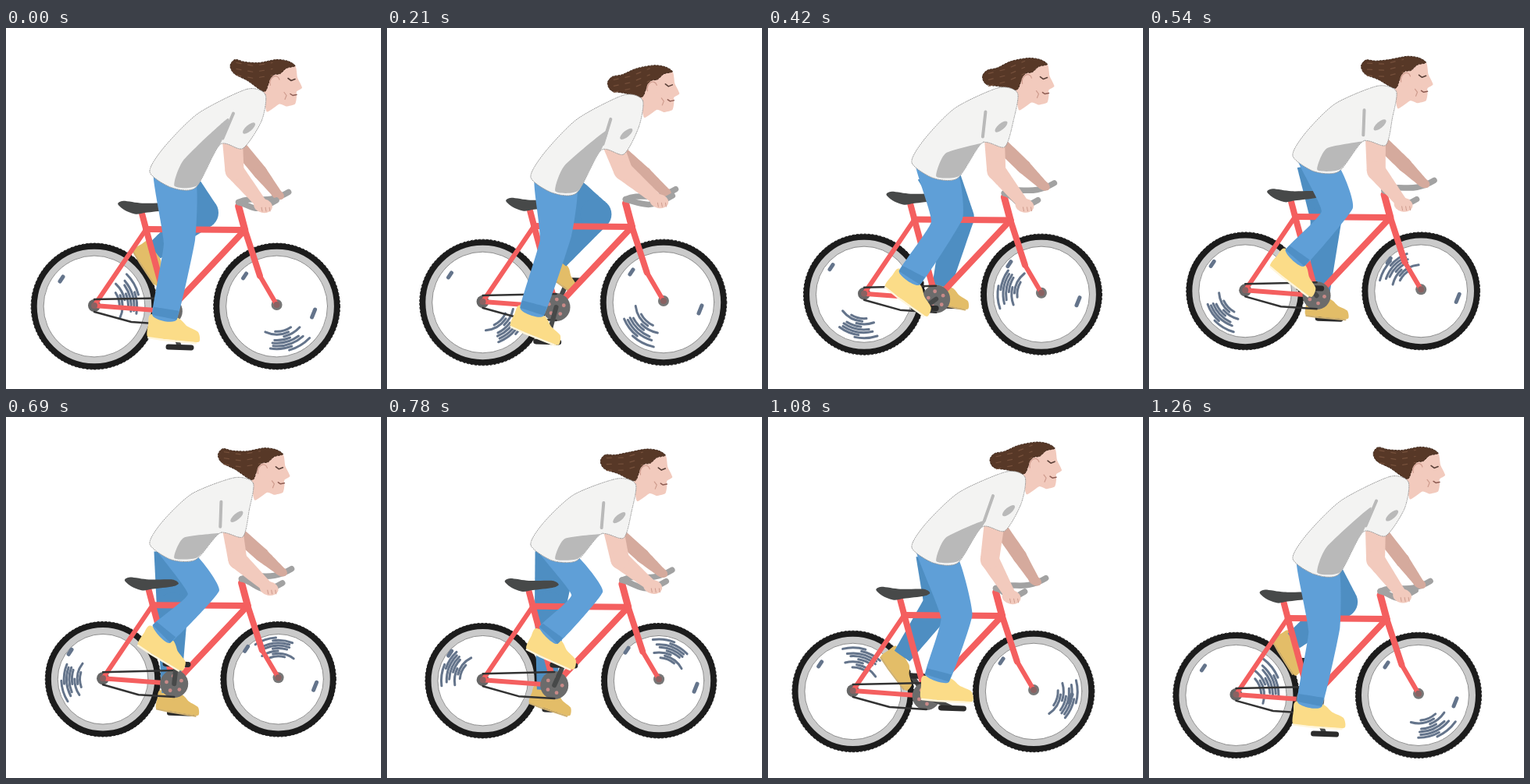
An HTML page with a canvas for the animation above (1.29 s loop, 480 by 463 pixels).

```html
<!DOCTYPE html>
<html lang="en">
<head>
<meta charset="utf-8">
<title>Cyclist</title>
<style>
html, body { margin: 0; width: 100%; height: 100%; overflow: hidden; background: #fff; }
canvas { display: block; }
</style>
</head>
<body>
<canvas id="stage" width="480" height="463"></canvas>
<script>
const ctx = document.getElementById('stage').getContext('2d');
const LOOP = 1290, STEP = 30;
let phase = 0; // crank angle, one turn per loop

const skin = '#f2cabd', farSkin = '#d5aa9d', skinLine = '#cf9c8e', red = '#f45f5f', jeans = '#5f9fd7',
  farJeans = '#4e8ec2', cuff = '#4f8fc5', yellow = '#fbdc88', farYellow = '#e3bd68', hairColor = '#573827',
  tyre = '#1c1c1c', rim = '#cacaca', streak = '#64748b', bar = '#a2a2a2', dark = '#474949',
  shirtColor = '#f3f3f2', shade = '#b9b9b9';

// Everything sways once per crank turn, and bobs once per pedal stroke (twice per turn).
const wave = (base, cos = 0, sin = 0, bob = 0) =>
  base + cos * Math.cos(phase) + sin * Math.sin(phase) + bob * Math.sin(2 * phase);

const add = ([x, y], dx, dy) => [x + dx, y + dy];
const mix = (a, b, u) => [a[0] + (b[0] - a[0]) * u, a[1] + (b[1] - a[1]) * u];

function side(a, b, width) {
  const angle = Math.atan2(b[1] - a[1], b[0] - a[0]);
  return [-Math.sin(angle) * width, Math.cos(angle) * width];
}

function fill(color) { ctx.fillStyle = color; ctx.fill(); }
function stroke(color, width) { ctx.strokeStyle = color; ctx.lineWidth = width; ctx.stroke(); }

function line(color, width, ...points) {
  ctx.beginPath();
  points.forEach(p => ctx.lineTo(...p));
  stroke(color, width);
}

function disc([x, y], r, color, ry = r, angle = 0) {
  ctx.beginPath();
  ctx.ellipse(x, y, r, ry, angle, 0, 7);
  fill(color);
}

// Closed spline; roundness 0 gives straight sides.
function blob(points, roundness, color) {
  const n = points.length, p = i => points[(i + n) % n], k = roundness / 6;
  ctx.beginPath();
  ctx.moveTo(...p(0));
  for (let i = 0; i < n; i++) {
    const [a, b, c, d] = [p(i - 1), p(i), p(i + 1), p(i + 2)];
    ctx.bezierCurveTo(b[0] + (c[0] - a[0]) * k, b[1] + (c[1] - a[1]) * k,
      c[0] - (d[0] - b[0]) * k, c[1] - (d[1] - b[1]) * k, ...c);
  }
  ctx.closePath();
  fill(color);
}

function limb(joints, widths, color) {
  for (let i = 0; i < joints.length - 1; i++) {
    const a = joints[i], b = joints[i + 1];
    const [ax, ay] = side(a, b, widths[i]), [bx, by] = side(a, b, widths[i + 1]);
    blob([add(a, ax, ay), add(b, bx, by), add(b, -bx, -by), add(a, -ax, -ay)], 0, color);
    if (i) disc(a, widths[i], color);
  }
}

function bikePose() {
  const hub = [wave(118.5, -5.5, 5, 3), wave(345.5, 10.5)], size = wave(1, 0.02);
  const at = (x, y) => add(hub, x * size, y * size);
  return { hub, axle: at(229, -1), crank: at(93, 7), post: at(60, -115), seat: at(65, -96),
    stem: at(181, -125), head: at(189, -95), radius: wave(77.5, 3.4, 1.8) };
}

function riderPose(bike) {
  const nose = [wave(371, 8, -1), wave(75.5, 1, 4, 5)];
  const hemFront = [243, wave(193.5, 11, 9, 5)], hemBack = add(hemFront, -59, -20);
  const hand = [wave(331, -2, 8, 13), wave(225, 3, 0, -5)], farGrip = add(bike.stem, 64, -18);
  return {
    nose, hemFront, hemBack, hand, farGrip,
    neckFront: add(nose, -47, 9), neckBack: add(nose, -71, 2), chest: add(nose, -52, 43),
    armpit: [274, nose[1] + 73], sleeve: [303, nose[1] + 78],
    elbow: [128 + hand[0] / 2, 183], farHand: add(farGrip, -14, 3),
    knee: [wave(236, -14, -15), wave(250, 24, 8)],
    ankle: [wave(199, 4, -18), wave(326, 45, 17)],
    footAngle: wave(17, -14, 11),
    farKnee: [wave(234, 18, 24, 4), wave(241, -4)],
    farAnkle: [wave(202, -12, 22, 6), wave(320, -34, -5)],
    farFootAngle: wave(29, 25, -10),
  };
}

function wheel(center, radius, angle, dots) {
  ctx.save();
  ctx.translate(...center);
  const ring = (r, color, width) => { ctx.beginPath(); ctx.arc(0, 0, r, 0, 7); stroke(color, width); };
  ring(radius - 11.5, rim, 9);
  ring(radius - 3.8, tyre, 7.6);
  ring(radius - 16, '#777', 0.8);
  ctx.setLineDash([2, 3]);
  ring(radius, tyre, 1);
  ctx.setLineDash([]);
  for (let i = 0; i < 8; i++) {
    const start = angle - 0.42 + 0.24 * Math.sin(i * 2.4);
    ctx.beginPath();
    ctx.arc(0, 0, (0.4 + 0.046 * i) * radius, start, start + 0.65 + 0.2 * Math.sin(i * 1.7));
    stroke(streak, 3);
  }
  for (const [x, y, tilt] of dots) line(streak, 5, [x - 2, y + tilt], [x + 2, y - tilt]);
  ctx.restore();
}

function foot(ankle, degrees, scale, color, sole) {
  ctx.save();
  ctx.translate(...ankle);
  ctx.rotate(degrees * Math.PI / 180);
  ctx.scale(scale, scale);
  blob([[-18, -3], [17, 0], [30, 10], [45, 17], [48, 27], [43, 31], [0, 29], [-21, 27], [-21, 10]], 0.7, color);
  line(sole, 2.5, [-20, 28], [0, 30], [43, 32]);
  ctx.restore();
}

function pedal(crank, at) {
  line(dark, 6, crank, at);
  line('#2c2c2c', 7, add(at, -14, 0), add(at, 15, 1));
}

function handlebar(stem, end, lift) {
  const [x, y] = add(stem, 0, -5);
  ctx.beginPath();
  ctx.moveTo(x, y);
  ctx.bezierCurveTo(x + 22, y - lift, end[0] - 30, end[1] + 18, ...end);
  stroke(bar, 7.5);
}

function bicycle({ hub, axle, crank, post, seat, stem, head }) {
  const bend = add(mix(head, axle, 0.52), -2, 9);
  disc(hub, 8, '#666');
  disc(axle, 7, '#777');
  line(red, 6, hub, seat);
  line(red, 6, hub, crank);
  line(red, 8, post, seat, crank);
  line(red, 8, seat, head);
  line(red, 8, crank, head);
  line(red, 9, stem, head);
  line(red, 8, head, bend);
  line(red, 6, bend, axle);
  disc(hub, 4, '#8a6262');
  disc(axle, 4, '#8a6262');
  disc(crank, 18, '#6b6b6b');
  for (let i = 0; i < 5; i++) {
    const a = i * 2 * Math.PI / 5 + phase;
    disc(add(crank, 10 * Math.cos(a), 10 * Math.sin(a)), 2.4, '#c98a88');
  }
  line('#333', 2.5, add(hub, 0, -8), add(crank, 0, -17));
  line('#333', 2.5, add(hub, 0, 8), mix(add(hub, 0, 15), add(crank, 0, 20), 0.5), add(crank, 0, 17));
  blob([[-31, -13], [-24, -17], [0, -14], [30, -14], [38, -9], [30, -5], [5, -2], [-8, 0], [-22, -5]]
    .map(p => add(post, ...p)), 0.8, dark);
}

function nearLeg({ hemBack, hemFront, knee, ankle, footAngle }) {
  const [dx, dy] = side(knee, ankle, 16);
  const back = add(ankle, dx, dy), front = add(ankle, -dx, -dy);
  const kneeBack = add(knee, -20, 2), kneeFront = add(knee, 20, -2);
  foot(ankle, footAngle, 0.97, yellow, '#fff6dc');
  blob([add(hemBack, 5, 2), add(hemFront, 0, -6), kneeFront, front, back, kneeBack], 0.4, jeans);
  blob([back, front, mix(front, kneeFront, 0.11), mix(back, kneeBack, 0.11)], 0, cuff);
}

function shirt({ nose, neckFront, neckBack, hemBack, hemFront, armpit, sleeve, chest }) {
  const hemMid = add(mix(hemBack, hemFront, 0.5), -2, 10);
  const fold = 35 * Math.max(0, Math.cos(phase - 0.3)), crease = add(nose, -88, 33);
  ctx.save();
  blob([neckFront, neckBack, add(mix(neckBack, hemBack, 0.5), 0, -22), add(mix(neckBack, hemBack, 0.85), 0, -16),
    hemBack, hemMid, hemFront, armpit, sleeve, chest], 0.75, shirtColor);
  ctx.setLineDash([1, 1.5]);
  stroke('#999', 1);
  ctx.setLineDash([]);
  ctx.clip();
  blob([add(hemMid, 4, -2), add(mix(hemMid, armpit, 0.35), -6, -16), add(armpit, fold * 0.3, -fold), armpit,
    add(hemFront, 2, -3)], 0.6, shade);
  line(shade, 4, crease, mix(crease, armpit, 0.8));
  disc(add(nose, -68, 52), 10, shade, 4, -0.7);
  ctx.restore();
}

function headShape({ nose, neckFront }) {
  const at = (x, y) => add(nose, x, y), flop = 20 * Math.sin(phase) ** 2;
  blob([at(-9, -28), at(-6, -13), nose, at(-7, 5), at(-7, 12), at(-9, 21), at(-20, 24), at(-29, 21),
    at(-45, 31), add(neckFront, -2, 0), at(-46, -8), at(-30, -26)], 0.55, skin);
  blob([at(-9, -28), at(-18, -34), at(-33, -36), at(-55, -32), at(-73, -33 + flop * 0.6), at(-86, -36 + flop),
    at(-92, -28 + flop), at(-87, -18 + flop), at(-70, -9 + flop * 0.6), at(-49, 5), at(-43, -5), at(-37, -16),
    at(-28, -18), at(-20, -25)], 0.9, hairColor);
  ctx.setLineDash([2, 2]);
  stroke('#3f281c', 1);
  ctx.setLineDash([6, 9]);
  for (const y of [-28, -20, -12]) line('#76503b', 1.2, at(-84, y + flop - 4), at(-62, y + flop * 0.4), at(-38, y - 4));
  ctx.setLineDash([]);
  disc(at(-35, -7), 7, skin, 9, 0.3);
  ctx.beginPath();
  ctx.ellipse(...at(-35, -7), 6, 8, 0.3, 2.4, 5.6);
  stroke(skinLine, 1.2);
  line('#5a4038', 1.6, at(-18, -12), at(-14, -9), at(-9, -11));
  line('#8d5c52', 1.5, at(-15, 8), at(-12, 10), at(-7, 9));
  line(skinLine, 1.2, at(-23, 6), at(-20, 10), at(-22, 15));
}

function draw() {
  ctx.clearRect(0, 0, 480, 463);
  ctx.lineCap = ctx.lineJoin = 'round';
  const bike = bikePose(), rider = riderPose(bike);
  const { hemBack, hemFront, armpit, sleeve, elbow, hand, farHand, farKnee, farAnkle, ankle } = rider;

  wheel(add(bike.hub, 0, 1), bike.radius, phase - 0.15, [[-42, -35, 3]]);
  wheel(add(bike.axle, 0, 2), bike.radius, phase + 1.4, [[-41, -39, 3], [47, 9, 5]]);
  pedal(bike.crank, add(farAnkle, 12, 25));
  foot(farAnkle, rider.farFootAngle, 0.8, farYellow, '#cfb070');
  limb([mix(hemBack, hemFront, 0.55), farKnee, farAnkle], [27, 20, 12], farJeans);
  bicycle(bike);

  handlebar(bike.stem, rider.farGrip, 10);
  limb([add(sleeve, -6, -4), add(mix(sleeve, farHand, 0.5), 0, 1), farHand], [9, 9, 6], farSkin);
  disc(farHand, 9, farSkin, 6, 0.5);

  pedal(bike.crank, add(ankle, 19, 38));
  nearLeg(rider);
  headShape(rider);
  handlebar(bike.stem, add(hand, 17, -7), -6);
  limb([add(mix(armpit, sleeve, 0.48), 2, -8), elbow, hand], [13, 12, 7], skin);
  disc(hand, 12, skin, 9, 0.2);
  for (const x of [-2, 3, 8]) line(skinLine, 1, add(hand, x, 2), add(hand, x + 1, 7));
  shirt(rider);
}

function tick() {
  const frame = Math.floor(performance.now() % LOOP / STEP);
  phase = (frame < 2 ? 0 : frame * STEP) / LOOP * 2 * Math.PI;
  draw();
  requestAnimationFrame(tick);
}
tick();
</script>
</body>
</html>
```
